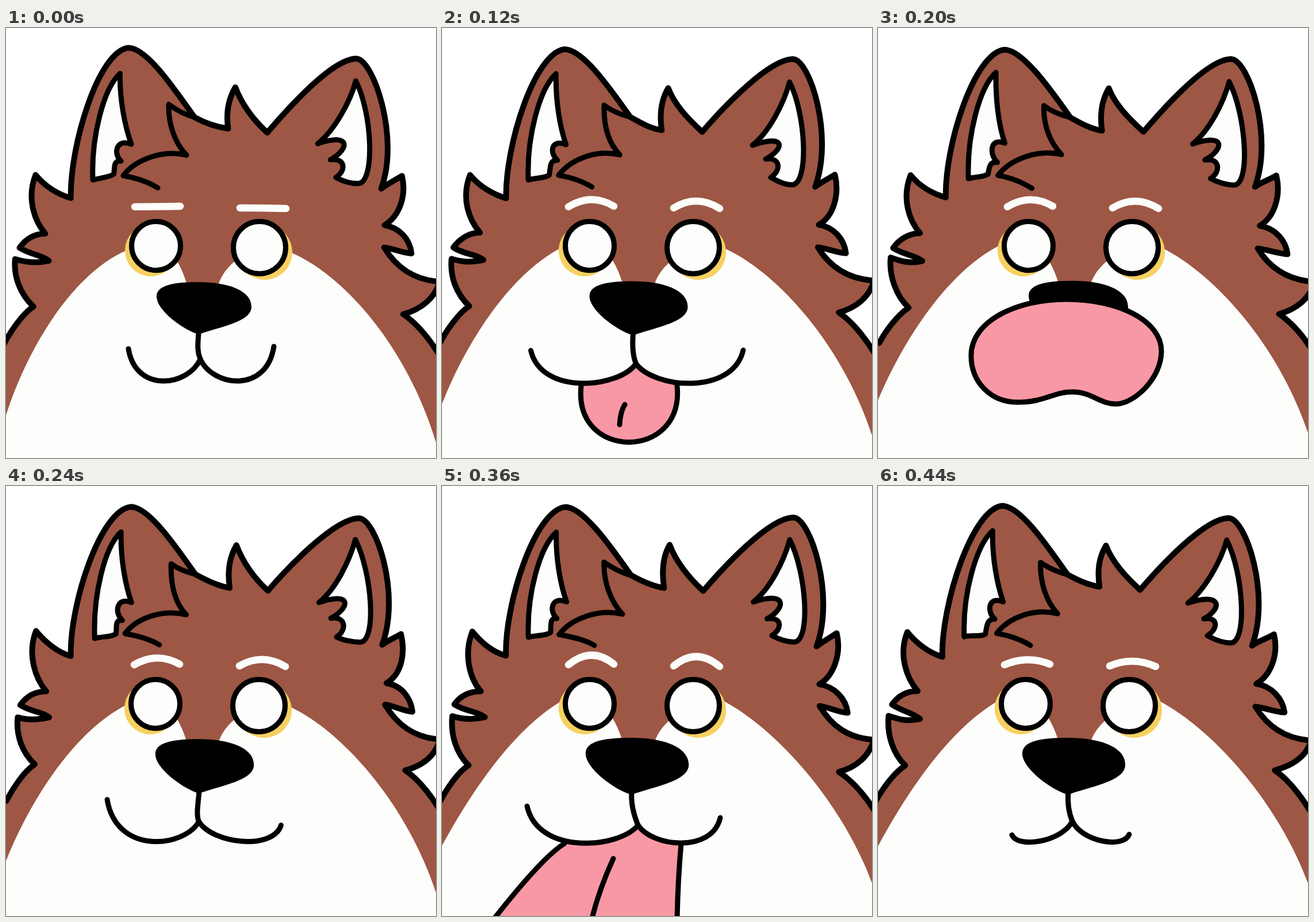
An HTML page for the animation above (480 ms loop, 748 px wide and 748 px high).

```html
<!DOCTYPE html>
<html lang="en">
<head>
<meta charset="utf-8">
<title>Panting dog</title>
<style>
  html, body { margin: 0; width: 100%; height: 100%; overflow: hidden; background: #fff; }
  svg { display: block; width: 100vw; height: 100vh; }
  .ink { stroke: #000; stroke-width: 9; stroke-linecap: round; stroke-linejoin: round; }
  .line { fill: none; }
  .white { fill: #fdfdfb; }
  .fur { fill: #9d5744; }
  .pink { fill: #f998a5; }
  .gold { fill: #f6d060; }
  .brow { fill: none; stroke: #fdfdfb; stroke-width: 12.5; stroke-linecap: round; }
</style>
</head>
<body>
<svg viewBox="0 0 748 748">
  <g id="head">
    <path id="fur" class="fur"/>
    <path id="outline" class="ink line" style="stroke-width:10"/>
    <path id="fringe" class="ink line"/>
    <path id="earL" class="ink white"/>
    <path id="earR" class="ink white"/>
  </g>
  <path id="muzzle" class="white"/>
  <g id="eyes">
    <path id="brows" class="brow"/>
    <circle class="gold" cx="252" cy="387" r="45"/>
    <circle class="gold" cx="450" cy="390" r="48"/>
    <circle class="ink white" cx="261" cy="379" r="42.5"/>
    <circle class="ink white" cx="441" cy="382" r="45.5"/>
  </g>
  <g id="mouth">
    <path id="tongueFill" class="pink"/>
    <path id="tongue" class="ink line"/>
    <path id="lipL" class="ink white"/>
    <path id="lipR" class="ink white"/>
    <path id="stem" class="ink line"/>
  </g>
  <path id="nose" d="M262 466C262 444 300 441 335 441C385 441 427 455 427 484C427 510 375 518 335 532C308 524 262 490 262 466Z"/>
  <path id="lick" class="ink pink" d="M162 570C162 510 240 472 328 472C420 472 493 510 493 562C493 610 445 654 414 654C385 654 372 633 338 633C305 633 290 651 243 651C195 651 162 615 162 570Z"/>
</svg>
<script>
const STEP = 40, COUNT = 12, BOIL = 4;
const $ = id => document.getElementById(id);
const set = (id, name, value) => $(id).setAttribute(name, value);

// Ink lines of the head at rest, as chains of cubic curves.
const ink = {
  outline: `M-3 549C8 528 30 497 49 485C27 464 14 433 17 401
    C30 405 48 410 74 404C60 393 44 394 23 381C35 364 52 357 69 357
    C50 335 36 295 52 254C68 274 90 290 112 296
    C110 205 162 42 214 36C245 36 290 100 328 154
    C346 164 366 174 386 177C382 150 384 125 397 103C408 132 430 158 455 181
    C490 140 568 56 610 55C640 55 684 190 651 278
    C661 270 676 264 687 257C695 290 685 328 658 344
    C684 348 703 368 706 393C690 392 672 384 656 382
    C676 415 706 438 753 441C745 470 722 488 692 496C716 512 744 545 768 592`,
  fringe: `M328 154C312 150 296 143 284 134C283 167 292 200 313 222
    C272 212 226 230 205 258C228 262 248 268 264 278`,
  earL: `M199 79C198 125 206 170 217 201C190 190 188 220 202 232
    C188 230 190 245 188 256C178 262 165 260 151 264C148 190 170 105 199 79`,
  earR: `M607 93C597 130 570 180 541 203C600 183 598 212 565 230
    C592 226 592 250 574 261C583 266 598 272 613 272C642 270 636 150 607 93`
};

// Key poses; mouth is the middle, the left end and the right end.
const poses = [
  { step: 0, sway: 0, gaze: 0, nose: 0, bulk: 0, arch: 0, mouth: [338, 576, 213, 558, 466, 554] },
  { step: 2, sway: -8, gaze: -5, nose: -6, bulk: 20, arch: 13, mouth: [329, 588, 146, 562, 522, 563] },
  { step: 4, sway: 4, gaze: -3, nose: 1, bulk: 25, arch: 36, mouth: [346, 580, 163, 560, 526, 558] },
  { step: 5, sway: 5, gaze: 1, nose: 4, bulk: 30, arch: 24, mouth: [338, 582, 172, 550, 490, 580] },
  { step: 7, sway: -1, gaze: -3, nose: -2, bulk: 19, arch: 22, mouth: [333, 586, 180, 541, 467, 600] },
  { step: 9, sway: -1, gaze: -4, nose: -5, bulk: 55, arch: 33, mouth: [341, 590, 148, 557, 484, 577] },
  { step: 11, sway: 0, gaze: -4, nose: -4, bulk: 54, arch: 17, mouth: [338, 583, 233, 607, 437, 606] }
];

// Tongue outline, with a centre crease when it hangs out.
const cap = dip => `M242 623C${250 - dip / 6} ${623 + dip} ${400 + dip / 6} ${623 + dip} 409 623`;
const tongues = {
  2: [cap(59), ''],
  3: [cap(130), 'M318 655Q310 668 309 690'],
  4: ['M234 620Q190 670 160 756H454Q434 680 437 622', 'M312 653Q299 700 301 760'],
  8: [cap(57), ''],
  9: ['M213 622Q175 645 88 756H409Q410 690 416 622', 'M298 648Q272 705 260 756']
};
const licks = [5, 10];

const mix = (a, b, u) => Array.isArray(a) ? a.map((v, i) => mix(v, b[i], u)) : a + (b - a) * u;

function poseAt(step) {
  const i = poses.findLastIndex(p => p.step <= step);
  const a = poses[i], b = poses[i + 1] || a;
  const u = a === b ? 0 : (step - a.step) / (b.step - a.step);
  return Object.fromEntries(Object.keys(a).map(k => [k, mix(a[k], b[k], u)]));
}

// Seeded by the corner's rest place, so that joined lines stay joined.
function jitter(x, y, step) {
  const n = Math.sin(x * 12.99 + y * 78.23 + step * 37.7) * 43758.5;
  return (n - Math.floor(n) - 0.5) * BOIL;
}

// Redraws a curve with shaken corners; handles go along with their corner.
function boil(d, step) {
  const v = d.match(/-?\d+/g).map(Number);
  const out = v.map((n, i) => {
    const c = Math.round((i >> 1) / 3) * 6;
    return n + (i % 2 ? jitter(v[c + 1], v[c], step) : jitter(v[c], v[c + 1], step));
  });
  return `M${out.slice(0, 2).join(' ')}C${out.slice(2).join(' ')}`;
}

function drawHead(step, { sway, bulk }) {
  for (const id in ink) set(id, 'd', boil(ink[id], step));
  set('fur', 'd', boil(ink.outline, step) + 'L790 592V760H-40V560Z');
  set('head', 'transform', `translate(${sway} 0)`);
  const join = 386 - bulk / 4;
  set('muzzle', 'd', `M-5 ${690 - bulk}C30 570 110 430 211 ${join}L280 380Q305 410 315 448
    H369Q378 415 420 390L492 ${join + 3}C592 430 705 565 752 ${735 - bulk * 0.6}V760H-5Z`);
}

function drawFace({ gaze, arch, nose, bulk }) {
  set('eyes', 'transform', `translate(${gaze} 0)`);
  set('brows', 'd', `M224 311Q264 ${311 - arch} 303 310M407 313Q447 ${313 - arch} 487 314`);
  const s = 1 + bulk * 0.0016;
  set('nose', 'transform', `translate(${344 + nose} 487) scale(${s}) translate(-344 -486)`);
}

// One lip from the middle of the mouth to its end, sagging to a common floor.
function lip(jx, jy, x, y) {
  const floor = jy / 2 + 326, h = (floor - (jy + y) / 8) / 0.75, w = x - jx;
  return `M${jx} ${jy}C${jx + w * 0.17} ${h - 6} ${x - w * 0.1} ${h + 6} ${x} ${y}`;
}

function drawMouth(step, { mouth, nose }) {
  const [jx, jy, lx, ly, rx, ry] = mouth;
  const [edge, crease] = tongues[step] || ['', ''];
  const nx = 335 + nose;
  set('lipL', 'd', lip(jx, jy, lx, ly));
  set('lipR', 'd', lip(jx, jy, rx, ry));
  set('stem', 'd', `M${nx} 531C${nx - 2} 555 ${jx - 5} ${jy - 12} ${jx} ${jy}`);
  set('tongue', 'd', edge + crease);
  set('tongueFill', 'd', edge && `${edge}L${jx} ${jy}Z`);
  const licking = licks.includes(step);
  set('mouth', 'visibility', licking ? 'hidden' : 'visible');
  set('lick', 'visibility', licking ? 'visible' : 'hidden');
}

let last = -1;
const start = performance.now();
function tick() {
  const step = Math.floor((performance.now() - start) / STEP) % COUNT;
  if (step !== last) {
    const pose = poseAt(step);
    drawHead(step, pose);
    drawFace(pose);
    drawMouth(step, pose);
    last = step;
  }
  requestAnimationFrame(tick);
}
tick();
</script>
</body>
</html>
```
